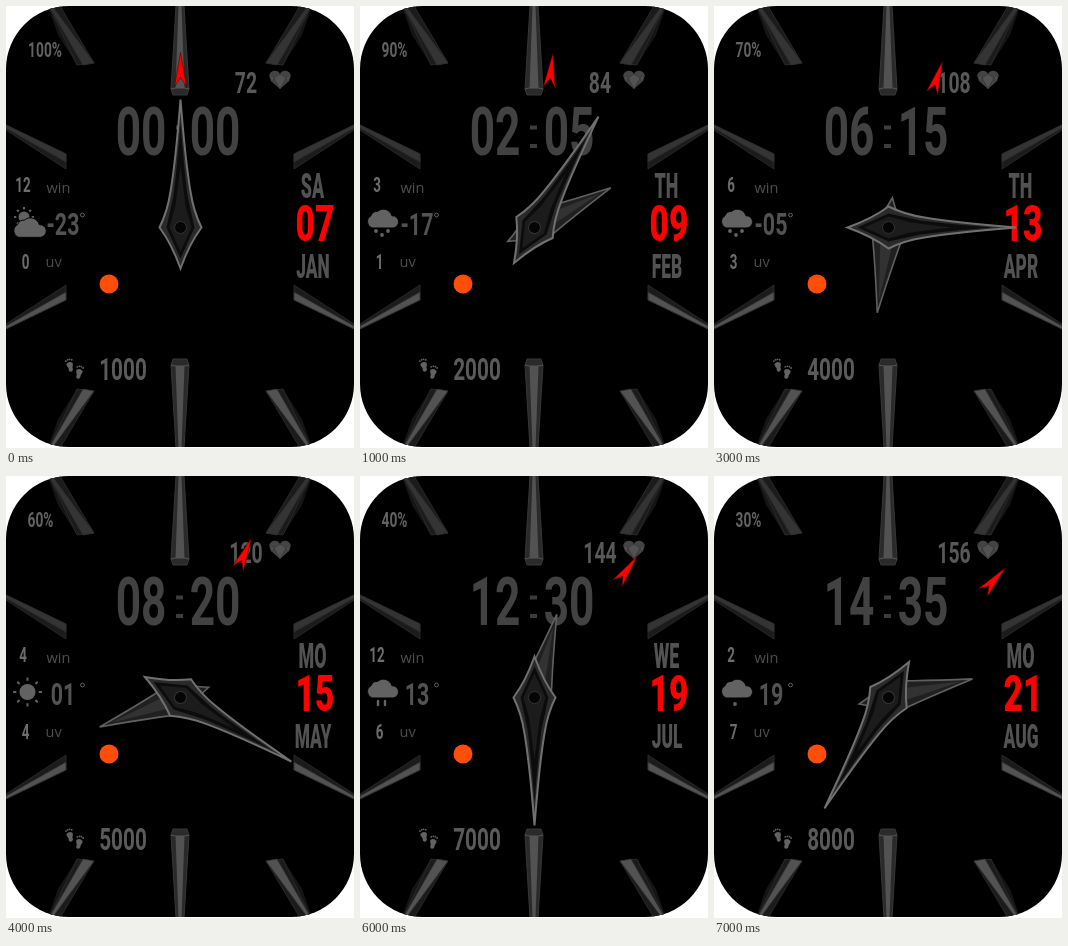
An HTML page that plays this animation: 348 by 442 pixels, repeating every 8 s.

```html
<!DOCTYPE html>
<html lang="en">
<head>
<meta charset="utf-8">
<title>Watch face</title>
<style>
  html, body { margin: 0; width: 100%; height: 100%; overflow: hidden; background: #fff; }
  svg { display: block; width: 348px; height: 442px; }
  text { font: 700 20px Roboto, sans-serif; text-anchor: middle; }
  .heavy { font-weight: 900; }
  .label { font: 400 14.5px "Open Sans", sans-serif; text-anchor: start; fill: #514d4a; }
  .upper { color: #343434; }
  .lower { color: #525252; }
</style>
</head>
<body>
<svg viewBox="0 0 348 442">
  <defs>
    <clipPath id="case"><rect width="348" height="441" rx="63"/></clipPath>
    <!-- Upper left quarter of the dial, measured from the centre -->
    <g id="quarter" stroke="#2e2e2e" stroke-width=".8">
      <path d="M-134-226L-86-164-103-162-122-192Z" fill="#151515" stroke="none"/>
      <path d="M-120-221L-86-164-103-162-131-221Z" fill="#1b1b1b"/>
      <path d="M-128-221L-86-164-97-162-131-221Z" fill="currentColor"/>
      <path d="M-174-102L-114-73V-58L-174-97Z" fill="#1b1b1b"/>
      <path d="M-174-102L-114-73V-65L-174-99Z" fill="currentColor"/>
    </g>
    <g id="bar">
      <path d="M-4-221H4L9-138 7-132H-7L-9-138Z" fill="#2a2a2a" stroke="#363636"/>
      <path d="M-1.5-221H1.5L4.5-139H-4.5Z" fill="#525252"/>
      <path d="M-9-138L-4.5-139H4.5L9-138" fill="none" stroke="#555"/>
    </g>
    <path id="cloud" d="M-9 9A6 6 0 0 1-10-2 6 6 0 0 1-4-6 8 8 0 0 1 9-2 5.5 5.5 0 0 1 10 9Z"/>
    <g id="hour">
      <path d="M0-86Q6-52 11-28L17 0Q7 12 0 30Q-7 12-17 0L-11-28Q-6-52 0-86Z" fill="#202020" stroke="#606060" stroke-width="1.6"/>
      <path d="M0-74L6-18 0 22-6-18Z" fill="#323232"/>
    </g>
    <g id="minute">
      <path d="M0-128Q5-65 10-36Q13-16 21 0Q9 16 0 41Q-9 16-21 0Q-13-16-10-36Q-5-65 0-128Z" fill="#2a2a2a" stroke="#707070" stroke-width="2"/>
      <path d="M0-104Q4-55 7-32L14 0 0 31-14 0-7-32Q-4-55 0-104Z" fill="#0c0c0c"/>
      <path d="M0-62L5-22 11 0 0 24-11 0-5-22Z" fill="#1c1c1c"/>
      <circle r="6" fill="#050505" stroke="#333"/>
    </g>
    <path id="second" d="M0-175L6-141 0-150-6-141Z" fill="#f00" stroke="#300" stroke-width=".5"/>
  </defs>

  <g clip-path="url(#case)">
    <rect width="348" height="442"/>
    <g transform="translate(174 221)">
      <use href="#quarter" class="upper"/>
      <use href="#quarter" class="upper" transform="scale(-1 1)"/>
      <use href="#quarter" class="lower" transform="scale(1 -1)"/>
      <use href="#quarter" class="lower" transform="scale(-1)"/>
      <use href="#bar"/>
      <use href="#bar" transform="scale(1 -1)"/>
    </g>

    <path d="M274 83L265 75Q261 67 267 65 272 64 274 68 276 64 281 65 287 67 283 75Z" fill="#444"/>
    <path d="M274 68L268 72 274 83 280 72ZM265 69L268 72 266 76M283 69L280 72 282 76" fill="#525252" stroke="#363636" stroke-width=".7"/>
    <circle cx="103" cy="278" r="9.5" fill="#ff4d0a"/>
    <g id="feet" fill="#626262"></g>
    <text class="label" x="40.5" y="187">win</text>
    <text class="label" x="39.5" y="261">uv</text>
    <circle cx="76.5" cy="209" r="1.9" fill="none" stroke="#626262"/>
    <path d="M170 121.5H177M170 140H177" stroke="#3c3c3c" stroke-width="4"/>
    <g id="data"></g>
    <g id="hands"></g>
  </g>
</svg>
<script>
const $ = id => document.getElementById(id);
const DIGITS = .67, LETTERS = .51;
const days = ['SA', 'TH', 'SA', 'TH', 'MO', 'SA', 'WE', 'MO'];
const months = ['JAN', 'FEB', 'MAR', 'APR', 'MAY', 'JUN', 'JUL', 'AUG'];
const winds = [12, 3, 5, 6, 4, 7, 12, 2];

const pad = n => String(n).padStart(2, '0');
const dot = (x, y, r) => `<circle cx="${x}" cy="${y}" r="${r}"/>`;
const text = (value, x, y, size, fill, condense = DIGITS, style = '') =>
  `<text transform="translate(${x} ${y}) scale(${condense} 1)" fill="${fill}"
    class="${style}" style="font-size:${size}px">${value}</text>`;
const hand = (id, angle) =>
  `<use href="#${id}" transform="translate(174.5 221.5) rotate(${angle})"/>`;

const cloud = (x, y, scale = 1.1) =>
  `<use href="#cloud" transform="translate(${x} ${y}) scale(${scale})" stroke="#000" stroke-width=".8"/>`;
const sun = (x, y, r) => {
  let rays = '';
  for (let a = 0; a < 360; a += 45)
    rays += `<path d="M0 ${-r * 1.4}V${-r * 1.8}" transform="translate(${x} ${y}) rotate(${a})"
      stroke="#626262" stroke-width="2"/>`;
  return dot(x, y, r) + rays;
};
const drops = (y, ...xs) => xs.map(x =>
  `<path d="M${x} ${y}v4" stroke="#626262" stroke-width="2.4" stroke-linecap="round"/>`).join('');
const flakes = (...points) => points.map(([x, y]) => dot(x, y, 1.9)).join('');

const sunny = () => sun(18, 211, 5.5) + cloud(23, 221, 1.15);
const snowy = () => cloud(22, 212) + flakes([16, 225], [22, 229], [28, 225]);
const weather = [
  sunny,
  snowy,
  () => sun(18, 210, 4.5) + cloud(23, 218, .9) + drops(228, 17, 23, 29),
  snowy,
  () => sun(21.5, 216, 8),
  sunny,
  () => cloud(22, 212) + drops(225, 18, 25),
  () => cloud(22, 212) + flakes([21, 228])
];

const foot = (x, y, angle) => {
  let toes = '';
  for (let k = 0; k < 4; k++) toes += dot(-3.3 + k * 2.2, -6.2 - Math.sin(k) * 1.3, 1);
  return `<g transform="translate(${x} ${y}) rotate(${angle}) scale(.9)">
    <path d="M-3.5-3Q0-6 3.5-3 4 0 2.3 2 3 6 0 6.5-3 6-2 2-4 0-3.5-3Z"/>${toes}</g>`;
};
$('feet').innerHTML = foot(64, 360, -12) + foot(73, 367, 12);

function draw(i) {
  const temp = 6 * i - 23;
  $('data').innerHTML =
    text(100 - 10 * i + '%', i ? 34.5 : 39, 51, 20.5, '#626262') +
    text(72 + 12 * i, 240, 87, 29, '#585858') +
    text(pad(2 * i), 135, 149, 66, '#424242') +
    text(pad(5 * i), 209, 149, 66, '#424242') +
    text(days[i], 306.5, 192, 35, '#525252', LETTERS, 'heavy') +
    text(pad(7 + 2 * i), 309, 235, 50, '#f00', DIGITS, 'heavy') +
    text(months[i], 307, 272, 34, '#525252', LETTERS, 'heavy') +
    text(winds[i], 17, 186, 20, '#6c6c6c') +
    text((temp < 0 ? '-' : '') + pad(Math.abs(temp)), 57, 229, 32, '#525252') +
    text(i, 19.5, 263, 20, '#6c6c6c') +
    text(1000 * (i + 1), 117, 374, 31, '#5a5a5a') +
    `<g fill="#626262">${weather[i]()}</g>`;
  $('hands').innerHTML = hand('hour', 62.5 * i) + hand('minute', 30 * i) + hand('second', 6 * i);
}

let shown = -1;
function tick() {
  const step = Math.floor(performance.now() / 1000) % 8;
  if (step !== shown) draw(shown = step);
  requestAnimationFrame(tick);
}
tick();
</script>
</body>
</html>
```
